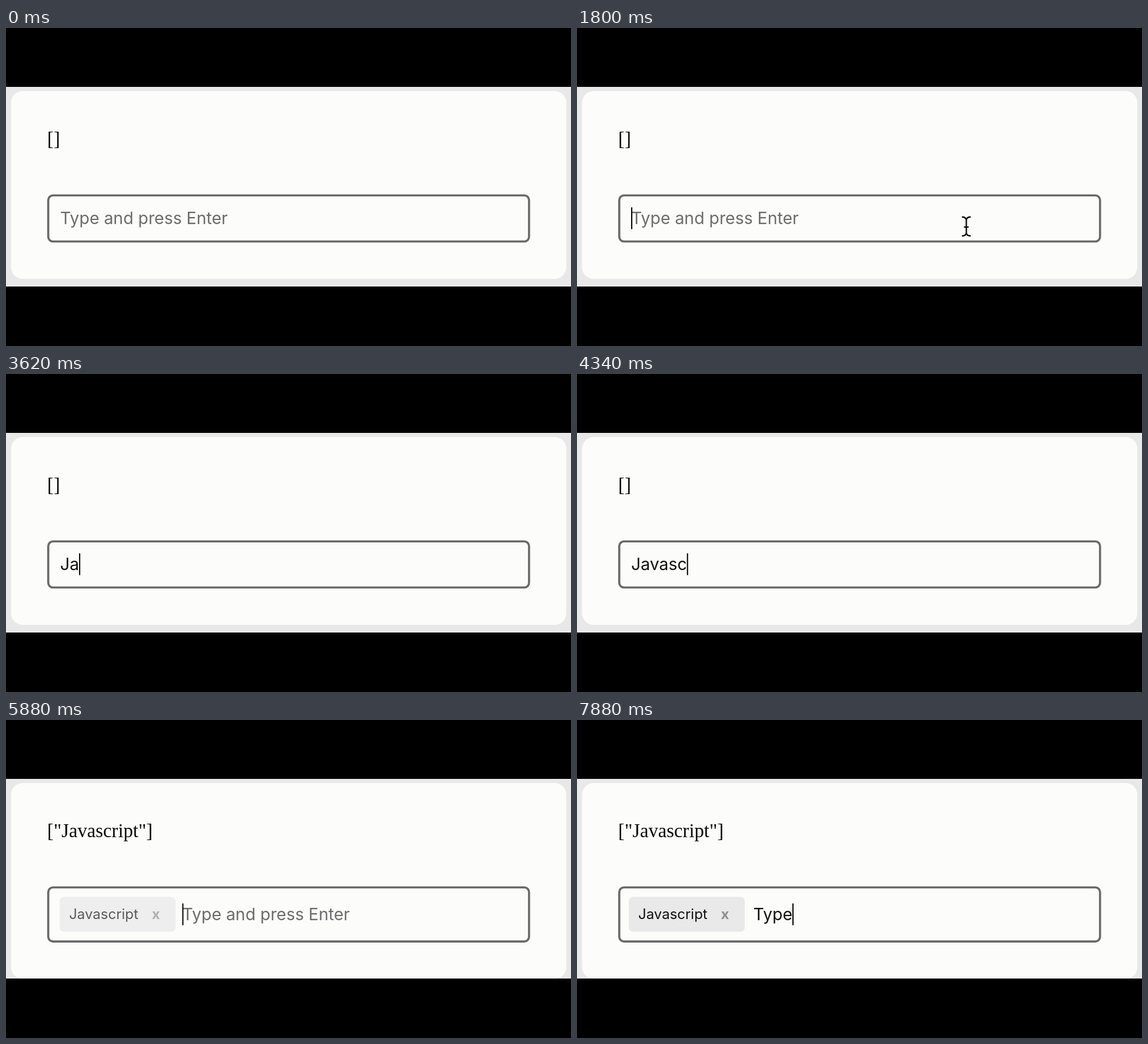
Animation of 960 by 540 pixels, one loop 8000 ms. Source, as an HTML page:

```html
<!DOCTYPE html>
<html lang="en">
<head>
<meta charset="utf-8">
<title>Tag input</title>
<style>
  html, body { margin: 0; width: 100%; height: 100%; overflow: hidden; background: #000; }
  svg { display: block; width: 960px; height: 540px; }
  text { font: 400 28.4px Inter, sans-serif; fill: #111; white-space: pre; }
  #model { font: 32.7px "Liberation Serif", serif; fill: #0a0a0a; }
  #hint { fill: #6c6c6c; }
  #tag text { font-size: 24px; }
  #tag .remove { font-weight: 700; fill: #909090; }
  #frame { fill: none; stroke: #6a6a6a; stroke-width: 3.6; }
  #caret { fill: #000; }
  #pointer { fill: none; stroke: #111; stroke-width: 2.4; stroke-linecap: round; }
</style>
</head>
<body>
<svg viewBox="0 0 960 540">
  <defs>
    <clipPath id="view"><rect y="100" width="960" height="339"/></clipPath>
  </defs>
  <g clip-path="url(#view)">
    <rect y="100" width="960" height="339" fill="#e8e8e8"/>
    <rect id="card" x="8.5" y="107" width="943.5" rx="20" fill="#fcfcfb"/>
    <text id="model" x="70" y="198.5"></text>
    <rect id="frame" x="71.8" y="284.3" width="816.9" rx="8"/>
    <g id="tag">
      <rect x="88" y="300.5" width="197" height="59" rx="7" fill="#e9e9e9"/>
      <text x="104" y="338">Javascript</text>
      <text class="remove" x="244.5" y="338">x</text>
    </g>
    <text id="hint">Type and press Enter</text>
    <text id="entry"></text>
    <rect id="caret" width="2" height="37"/>
    <path id="pointer" d="M-6.5-16Q-1-16 0-11Q1-16 6.5-16M0-11V11M-6.5 16Q-1 16 0 11Q1 16 6.5 16M-3 1H3"/>
  </g>
</svg>
<script>
const LOOP = 8000, BLINK = 500;
const FOCUS = 1360, ENTER = 5680, POINTER_IN = 1100, POINTER_OUT = 2780;
const words = [
  { text: "Javascript", keys: [3140, 3340, 3640, 3840, 4040, 4300, 4480, 4700, 5080, 5260] },
  { text: "Type", keys: [6720, 6920, 7200, 7560] }
];
const [card, model, frame, tag, hint, entry, caret, pointer] =
  ["card", "model", "frame", "tag", "hint", "entry", "caret", "pointer"]
    .map(id => document.getElementById(id));
const resets = [FOCUS, ENTER, ...words.flatMap(w => w.keys)].sort((a, b) => a - b);

const set = (el, attrs) => {
  for (const name in attrs) el.setAttribute(name, attrs[name]);
};
const show = (el, on) => el.style.display = on ? "" : "none";

// CSS "ease": cubic-bezier(.25, .1, .25, 1)
function ease(x) {
  if (x <= 0 || x >= 1) return Math.max(0, Math.min(1, x));
  const bezier = (s, a, b) => 3 * s * (1 - s) ** 2 * a + 3 * s * s * (1 - s) * b + s ** 3;
  let low = 0, high = 1;
  for (let i = 0; i < 20; i++) {
    const mid = (low + high) / 2;
    if (bezier(mid, .25, .25) < x) low = mid; else high = mid;
  }
  return bezier(low, .1, 1);
}

function draw(t) {
  const tagged = t >= ENTER;
  const word = words[tagged ? 1 : 0];
  const typed = word.text.slice(0, word.keys.filter(k => k <= t).length);
  const x = tagged ? 299.5 : 92;
  const y = tagged ? 340 : 333;

  set(card, { height: tagged ? 332.5 : 319 });
  set(frame, { height: tagged ? 91.8 : 78.2 });
  model.textContent = tagged ? '["Javascript"]' : "[]";

  const p = ease((t - ENTER) / 500);
  show(tag, tagged);
  set(tag, { opacity: p, transform: `translate(${10 * (1 - p)} 0)` });

  set(hint, { x, y });
  show(hint, !typed);
  set(entry, { x, y });
  entry.textContent = typed;

  const last = resets.filter(k => k <= t).pop();
  show(caret, last !== undefined && (t - last) % (2 * BLINK) < BLINK);
  set(caret, { x: x + (typed ? entry.getComputedTextLength() : 0), y: y - 28.5 });

  const move = ease((t - POINTER_IN) / 160);
  show(pointer, t >= POINTER_IN && t < POINTER_OUT);
  set(pointer, { transform: `translate(${671.5 - 10 * move} ${304 + 33 * move})` });
}

function tick() {
  draw(performance.now() % LOOP);
  requestAnimationFrame(tick);
}
tick();
</script>
</body>
</html>
```
